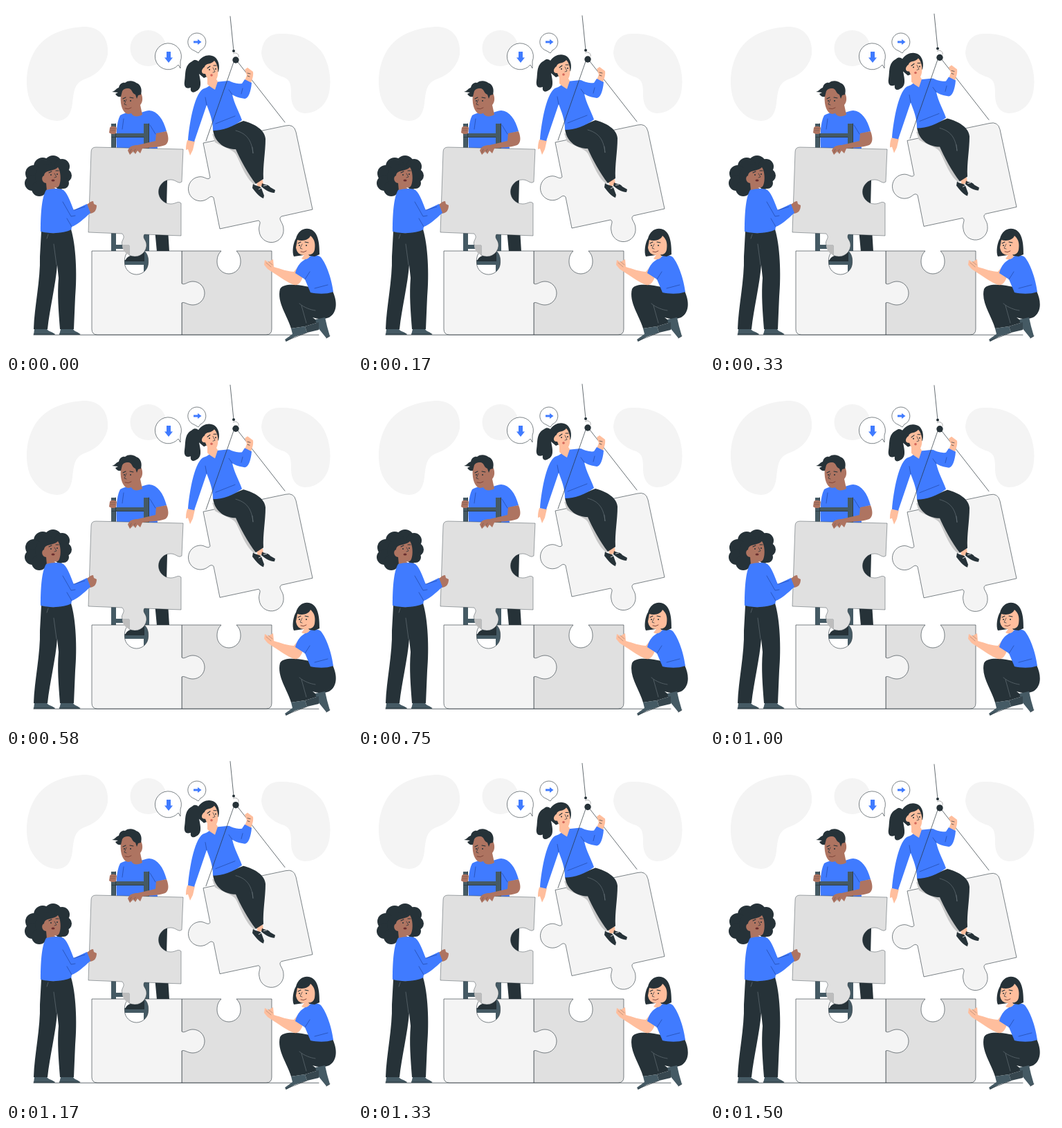
Write an HTML page that moves like this. It is 500x500 px and loops after 1540 ms.

```html
<!DOCTYPE html>
<html lang="en">
<head>
<meta charset="utf-8">
<title>Puzzle team</title>
<style>
  html, body { margin: 0; height: 100%; overflow: hidden; background: #fff; }
  svg { display: block; width: 100vw; height: 100vh; }
  .blob { fill: #f4f4f4; }
  .dark { fill: #263238; }
  .slate { fill: #455a64; }
  .blue { fill: #407bff; }
  .brown { fill: #ae7461; }
  .peach { fill: #ffbe9d; }
  .pale { fill: #f4f4f4; }
  .grey { fill: #e0e0e0; }
  .edge { stroke: #263238; stroke-width: .6; stroke-linejoin: round; }
  .line { fill: none; stroke: #263238; stroke-width: .7; stroke-linecap: round; }
  .brow { fill: none; stroke: #263238; stroke-width: 1.1; stroke-linecap: round; }
  .fold { fill: none; stroke: #1c3f94; stroke-width: .6; stroke-linecap: round; }
  .seam { fill: none; stroke: #6d7a80; stroke-width: .6; stroke-linecap: round; }
  .lip { fill: none; stroke: #7a3f35; stroke-width: .9; stroke-linecap: round; }
</style>
</head>
<body>
<svg viewBox="0 0 500 500" preserveAspectRatio="none">
  <!-- backdrop -->
  <g class="blob">
    <path d="M45 60C60 39 90 30 116 30C138 31 149 49 147 70C143 90 128 101 113 106C98 112 98 125 96 141C94 158 86 166 74 166C56 166 41 152 34 135C26 110 30 80 45 60Z"/>
    <circle cx="205.500" cy="61" r="26"/>
    <path d="M369 68C370 51 379 40 396 40C420 39 441 47 456 66C467 82 471 106 467 125C463 143 449 155 432 155C418 154 412 143 412 128C412 114 411 107 402 103C388 99 371 88 369 68Z"/>
  </g>
  <g fill="#fff" class="edge">
    <path d="M249 85A19 19 0 1 1 252 80L252 90Z"/>
    <path d="M272 64.500A13 13 0 1 1 281 64L278 68Z"/>
  </g>
  <path class="blue" d="M232 66H238V74.500H241L235 82L229 74.500H232Z"/>
  <path class="blue" d="M271 50.500H277V48L282.500 52L277 56V53.500H271Z"/>
  <path class="line" d="M40 475.300H452"/>

  <!-- man on the ladder -->
  <path class="dark" d="M198 215H234L232 290L236 355H218L212 290Z"/>
  <path class="blue" d="M165 158C172 154 179 153 184 155C192 157 200 151 207 151C219 152 227 163 232 181L217 185L219 206H160C159 190 159 169 165 158Z"/>
  <path class="brown" d="M167 120C164 135 166 147 171 153C174 157 179 156 181 155C184 161 192 160 197 157L194 143C198 139 198 131 195 126L186 116Z"/>
  <path class="dark" d="M153 124C158 123 159 119 163 118C164 112 169 110 172 111C178 106 186 109 188 111C195 113 197 121 195 128L191 129L189 134L187 128C181 126 183 119 176 119C172 119 170 120 168 123L166 131C162 132 160 130 158 127L162 125Z"/>
  <path class="brow" d="M169 134L173 132M179 132L184 133"/>
  <path class="line" d="M174 135L171 142L174 143"/>
  <circle class="dark" cx="171" cy="137" r="1"/>
  <circle class="dark" cx="180" cy="137" r="1"/>
  <path class="lip" d="M172 148Q177 150 181 147"/>
  <path class="fold" d="M170 163L168 178M208 172L216 185"/>
  <g class="slate">
    <path d="M152 170H159V375H152ZM199 170H207V386H199ZM152 184H207V190H152ZM155 345H203V351H155ZM155 367H207V374H155Z"/>
  </g>
  <path class="line" d="M158.500 170V204M206.500 170V204M153 189.500H199"/>
  <path class="brown" d="M150 176C151 173 158 173 160 176L159 184C156 186 151 185 149 183Z"/>
  <path class="line" d="M151 177H158M151 180H158" stroke-opacity=".4"/>
  <path class="dark" d="M172 369C174 362 180 360 185 361L200 356V369Z"/>

  <!-- lower pieces -->
  <path class="grey edge" d="M254 354H311C306 359 305 364 305 370A17 17 0 0 0 339 370C339 364 338 359 333 354H384V467Q384 475 376 475H254Z"/>
  <path class="pale edge" d="M124 354H177C172 359 171 365 171.500 371A17 17 0 0 0 205.500 371C206 365 205 359 200 354H254V401C258 404 262 398 270 398A17 17 0 0 1 270 432C262 432 258 427 254 429V475H132Q124 475 124 467Z"/>

  <!-- upright piece -->
  <path class="grey edge" d="M130 204L256 207L254 254C249 258 246 251 238 251A17.500 17.500 0 0 0 238 286C246 286 248 281 253 285L253 332L200 330C196 336 204 338 203 347A17 17 0 0 1 178 360V346H168C165 338 174 336 168 329L119 327L123 211Q123 204 130 204Z" stroke-opacity=".7"/>
  <path d="M168 346H178V360C172 357 168 352 168 346Z" fill="#bdbdbd"/>
  <path class="brown" d="M217 184L232 181C236 191 235 198 230 201C219 205 206 204 197 206L194 213L190 209L187 214L184 210L179 215L176 209C178 203 183 201 190 201L216 195Z"/>
  <path class="line" d="M181 207L179 212M187 207L184 212" stroke-opacity=".4"/>

  <!-- woman with curly hair -->
  <g class="dark">
    <circle cx="68" cy="229" r="13"/>
    <circle cx="53" cy="232" r="13"/>
    <circle cx="40" cy="242" r="12"/>
    <circle cx="38" cy="256" r="11"/>
    <circle cx="48" cy="264" r="11"/>
    <circle cx="81" cy="232" r="11"/>
    <circle cx="85" cy="245" r="10"/>
    <circle cx="83" cy="256" r="8"/>
    <circle cx="60" cy="247" r="18"/>
    <circle cx="78" cy="258" r="7"/>
  </g>
  <path class="brown" d="M55 245C56 236 68 240 75 233C79 238 80 252 77 259C75 263 72 263 69 262L77 268C72 273 64 271 59 267L58 256C52 256 50 247 55 245Z"/>
  <path class="brow" d="M62 241L66 239M72 238L76 238"/>
  <circle class="dark" cx="65" cy="244" r="1"/>
  <circle class="dark" cx="74" cy="243" r="1"/>
  <path class="line" d="M70 242L73 247L70 248"/>
  <ellipse cx="68" cy="252" rx="2.500" ry="1.500" fill="#6b2f2f"/>
  <path class="brown" d="M116 287C120 286 121 282 126 282L127 286L131 288C131 295 128 300 120 300Z"/>
  <path class="blue" d="M58 266C66 264 77 263 83 266C90 272 94 286 98 295L117 286L122 299C112 308 102 317 95 319L94 325C81 329 62 330 50 326C50 305 51 277 58 266Z"/>
  <path class="fold" d="M82 283L94 304L100 303M95 319L88 307M98 295L114 290"/>
  <path class="dark" d="M51 326C65 330 86 328 94 323C101 345 103 388 100 420L98 467H78C76 440 74 418 76 393L74 374C72 402 63 438 60 467H40C41 434 50 396 49 362Z"/>
  <path class="seam" d="M73 374L69 344M61 330L59 336"/>
  <path class="slate" d="M41 467H59C62 471 69 471 71 475H40ZM79 467H97C99 471 106 471 107 475H77Z"/>
  <path class="line" d="M40 474H70M77 474H107"/>

  <!-- hoisted piece and rider -->
  <g id="lift">
    <path class="pale edge" d="M285 198L404 173Q416 170 419 182L443 294L398 304C392 308 401 313 401 322A17.500 17.500 0 0 1 366 326C364 317 370 313 365 310L309 322L300 277C295 272 293 280 284 281.500A17.500 17.500 0 0 1 278 247C287 245 291 253 295 248Z"/>
    <path d="M298 185L302 197C316 205 327 207 332 214C340 229 346 249 359 258L366 252L340 194Z" fill="#c7c7c7"/>
    <path class="line" d="M324 15L329 65"/>
    <path d="M328 69C333 66 337 70 336 74" fill="none" stroke="#999" stroke-width=".8"/>
    <circle class="dark" cx="329" cy="65" r="2"/>
    <circle class="dark" cx="332" cy="78" r="4.700"/>
    <path class="line" d="M335 81L403 168"/>
    <path class="peach" d="M262 194C260 200 260 204 260 208L263 207L266 216L270 208L273 195ZM345 108L348 100L345 92L349 89L357 95C358 102 355 107 354 112Z"/>
    <path class="peach" d="M362 254L371 251L372 259L364 262Z"/>
    <path class="dark" d="M357 257C361 261 366 259 369 263L373 274L372 278C366 276 360 268 356 263Z"/>
    <path class="dark" d="M370 256C374 259 379 257 382 262L389 266L388 270C380 270 373 264 369 261Z"/>
    <path d="M365 265L369 263M372 260L377 259" stroke="#fff" stroke-width=".8"/>
    <path class="dark" d="M299 179C314 179 330 171 343 166C359 170 374 179 375 192C375 211 371 231 372 250L361 257C350 243 338 221 332 207C319 207 302 200 299 179Z"/>
    <path class="seam" d="M332 180C347 184 355 193 357 213L356 204"/>
    <path class="blue" d="M287 119C293 118 296 111 302 110L322 108C330 112 338 113 341 112L345 106L355 111C354 124 350 134 345 134C338 133 331 131 327 128C330 142 337 153 341 165C329 174 313 180 299 180C299 164 294 154 290 143L272 196L263 194C265 169 273 122 287 119Z"/>
    <path class="fold" d="M290 143L288 132M327 128L322 121M303 170L331 159M342 119L340 127"/>
    <path class="peach" d="M291 104V113C295 117 299 119 302 121L306 109L302 103Z"/>
    <path class="dark" d="M278 80C284 71 295 69 302 74C308 79 309 88 307 95L286 104L279 98C281 108 284 119 275 123C269 127 266 123 267 118C259 121 257 115 258 109C260 99 257 86 269 80C272 77 276 78 278 80Z"/>
    <path class="peach" d="M287 88C288 82 297 85 301 79C307 85 308 99 304 106C301 110 294 108 290 103L288 98C282 99 281 92 287 88Z"/>
    <path class="brow" d="M291 90L295 87M300 86L304 86"/>
    <circle class="dark" cx="294" cy="92" r="1"/>
    <circle class="dark" cx="303" cy="91" r="1"/>
    <path class="line" d="M299 89L302 95L299 96"/>
    <circle cx="297" cy="100" r="1.800" fill="#d4685b"/>
    <path class="line" d="M329 81L289 195M349 97L353 98M349 101L352 102"/>
  </g>

  <!-- crouching woman -->
  <path class="dark" d="M396 409C400 401 417 402 433 405L472 412C479 427 479 443 467 450C457 454 449 452 443 450L452 457L432 463L412 466C407 448 391 428 396 409Z"/>
  <path class="seam" d="M424 430C431 436 440 439 447 440M427 433L434 458"/>
  <path class="slate" d="M412 466L432 463L435 472L417 478L405 485L403 482L414 474ZM447 453L461 450L464 463L468 477L463 480L450 464Z"/>
  <path class="line" d="M404 484L435 472M463 480L468 477"/>
  <path d="M432 463L452 457V468L435 472Z" fill="#37474f"/>
  <path class="peach" d="M430 389C426 400 423 404 416 403C407 400 395 391 387 386L378 380L373 374L374 367L379 370L386 366L387 377C397 380 408 384 416 384L421 378Z"/>
  <path class="line" d="M376 371L383 377M379 369L385 374" stroke-opacity=".4"/>
  <path class="blue" d="M431 367C438 360 449 358 455 363C464 374 471 397 473 413C462 417 449 416 440 414L432 395L418 386C420 378 424 371 431 367Z"/>
  <path class="fold" d="M432 395L439 384M446 408L465 403"/>
  <path class="dark" d="M419 336C422 324 432 319 441 323C452 328 453 345 453 359L446 362L430 360L416 362C413 356 415 342 419 336Z"/>
  <path class="peach" d="M421 338C428 340 437 339 440 332C447 338 447 345 446 352C445 358 440 360 437 359L439 362C436 367 430 367 427 365L431 360C424 360 420 356 419 349Z"/>
  <path class="brow" d="M422 343L426 341M432 341L437 342"/>
  <circle class="dark" cx="424" cy="346" r="1"/>
  <circle class="dark" cx="434" cy="346" r="1"/>
  <path class="line" d="M428 344L425 350L428 351"/>
  <path class="lip" d="M426 355Q430 357 434 354"/>
</svg>
<script>
  const LOOP = 1540, STEPS = 37, RISE = 9;
  const lift = document.getElementById('lift');
  const start = performance.now();

  function draw() {
    const t = (performance.now() - start) % LOOP;
    const step = Math.floor((t + 4) * STEPS / LOOP);
    const y = RISE * (Math.cos(2 * Math.PI * step / STEPS) - 1) / 2;
    lift.setAttribute('transform', `translate(0 ${y.toFixed(2)})`);
    requestAnimationFrame(draw);
  }
  draw();
</script>
</body>
</html>
```
